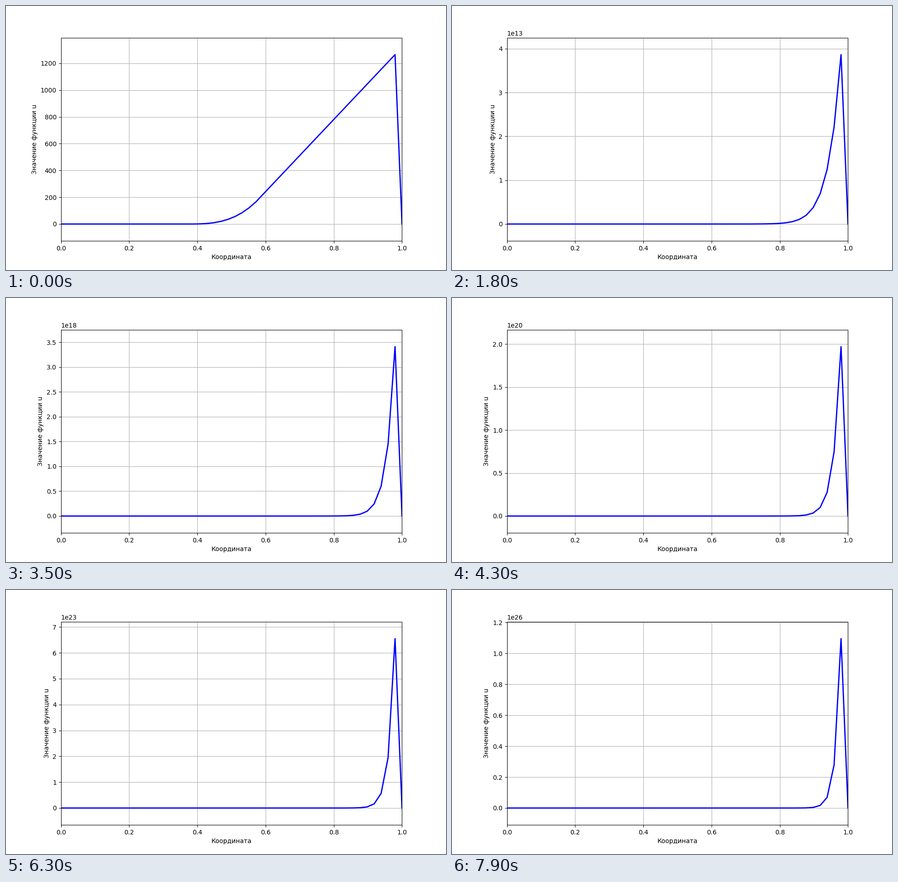
Animation, 966 px wide and 580 px high, one loop 8 s. Source, as a matplotlib script:

```python
import numpy as np
import matplotlib.pyplot as plt
from matplotlib.animation import FuncAnimation

NODES = 50
FRAMES = 80
INTERVAL = 100

x = np.linspace(0, 1, NODES)


def solve():
    """Unstable sweep: every step adds the already updated left neighbour."""
    u = np.zeros(NODES)
    u[20:30] = np.arange(1, 11)
    u = np.cumsum(u)
    layers = []
    for _ in range(FRAMES):
        u = np.cumsum(u)
        u[-1] = 0
        layers.append(u)
    return layers


layers = solve()

fig, ax = plt.subplots(figsize=(9.66, 5.8), dpi=100)
line, = ax.plot(x, layers[0], color="blue", lw=2)
ax.set_xlim(0, 1)
ax.set_xlabel("Координата")
ax.set_ylabel("Значение функции u")
ax.grid(True)


def update(n):
    u = layers[n]
    peak = u.max()
    line.set_ydata(u)
    ax.set_ylim(-0.1 * peak, 1.1 * peak)
    return line,


anim = FuncAnimation(fig, update, frames=FRAMES, interval=INTERVAL,
                     repeat=True, repeat_delay=0, blit=False)
plt.show()
```
